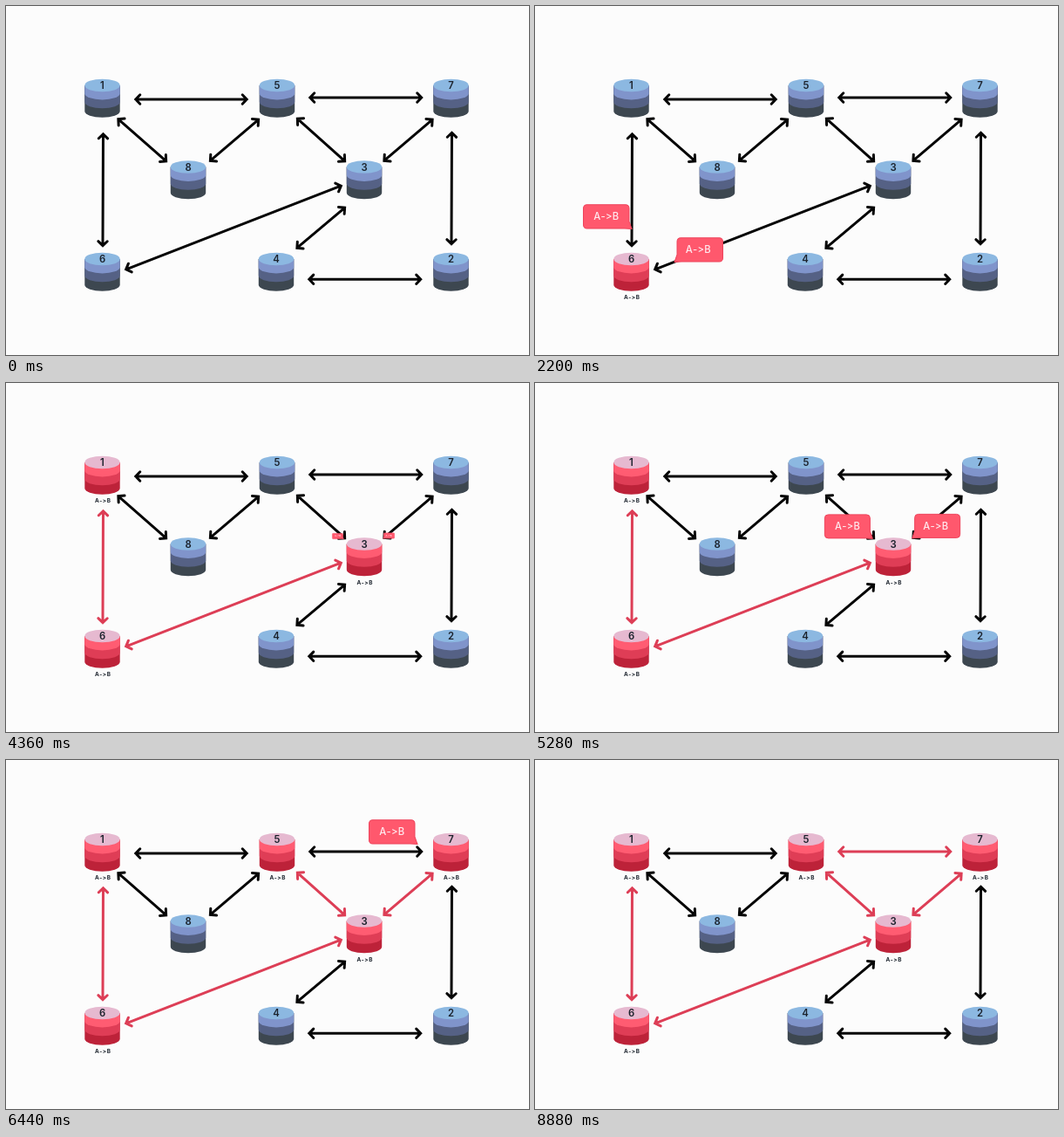
Animation, 600 px wide and 400 px high, one loop 9.04 s. Source, as an HTML page with a canvas:

```html
<!DOCTYPE html>
<html lang="en">
<head>
<meta charset="utf-8">
<title>Gossip network</title>
<style>
  html, body { margin: 0; width: 100%; height: 100%; overflow: hidden; background: #fcfcfc; }
  canvas { display: block; width: 600px; height: 400px; }
</style>
</head>
<body>
<canvas id="stage"></canvas>
<script>
const LOOP = 9040, STEP = 40, POP = 310, SHRINK = 300;
const canvas = document.getElementById('stage');
const ctx = canvas.getContext('2d');
const dpr = window.devicePixelRatio || 1;
canvas.width = 600 * dpr;
canvas.height = 400 * dpr;

const BLUE = ['#8cb8e1', '#8094cb', '#556185', '#3d4750'];
const RED = ['#e6b9d0', '#ff5c72', '#df3d56', '#bd2239'];
const INK = '#1b222c';

// Label, centre x, lid y and the time the node turns red
const nodes = [
  ['1', 110.5, 91, 3600], ['5', 311, 91, 5840], ['7', 510.5, 91, 5840],
  ['8', 209, 184.5, Infinity], ['3', 411, 184.5, 3600], ['6', 110.5, 290, 1880],
  ['4', 310, 290, Infinity], ['2', 510.5, 290, Infinity]
];

// Both tips and the time the link turns red
const links = [
  [147, 107, 278, 107, Infinity], [347, 105, 478.5, 105, 7320],
  [111.5, 145, 111, 276.5, 3600], [127.5, 128.5, 185, 179, Infinity],
  [233, 178.5, 291, 129, Infinity], [333, 128, 390, 179, 5840],
  [432.5, 178.5, 490.5, 129, 5840], [511.5, 143.5, 511, 274.5, Infinity],
  [136, 302.5, 386, 205.5, 3600], [332.5, 278.5, 390, 230, Infinity],
  [346, 313.3, 477.5, 313.3, Infinity]
];

// Tail path, side of the body, and times: pop, move, move length, end
const packets = [
  { from: [111, 256], to: [111, 144], side: -1, pop: 1907, move: 2950, span: 620, end: 3600 },
  { from: [160, 294], to: [380, 210], side: 1, pop: 1907, move: 2950, span: 620, end: 3600 },
  { from: [387.5, 179], to: [333, 128], side: -1, pop: 4347, move: 5260, span: 580, end: 5840 },
  { from: [432.5, 178.5], to: [487.5, 132], side: 1, pop: 4347, move: 5260, span: 580, end: 5840 },
  { from: [472, 97], to: [395, 97], side: -1, pop: 6147, move: 6910, span: 400, end: 7320 }
];

const bubbles = [
  { x: 125.5, y: 279, w: 101, h: 48.5, pop: 187, out: 1550, swing: 0.72,
    fill: '#fdfdff', edge: '#c6d4ee', line: 1, size: 9.6,
    text: [['New Transaction', 17, -29], ['A->B', 17, -14]] },
  { x: 340.5, y: 95.2, w: 93, h: 45, pop: 7402, out: 8580, swing: 0,
    fill: '#f9a72d', edge: '#c98d33', line: 1.5, size: 9.15,
    text: [['Already', 18.5, -27.2], ['Heard That !', 18.5, -12.2]] }
];

const clamp = v => Math.min(1, Math.max(0, v));
const easeInOut = p => p < 0.5 ? 2 * p * p : 1 - 2 * (1 - p) ** 2;
const backOut = p => 1 + 4.1 * (p - 1) ** 3 + 3.1 * (p - 1) ** 2;
const popScale = (t, start) => backOut(clamp((t - start) / POP));

// Glyph by glyph, so that "->" never becomes a ligature
function write(str, x, y, size, weight, color, centered, gap = 0) {
  ctx.font = `${weight} ${size}px Inter, "Open Sans", sans-serif`;
  ctx.fillStyle = color;
  ctx.textAlign = 'left';
  const widths = [...str].map(c => ctx.measureText(c).width + gap);
  if (centered) x -= (widths.reduce((a, b) => a + b, 0) - gap) / 2;
  [...str].forEach((c, i) => {
    ctx.fillText(c, x, y);
    x += widths[i];
  });
}

function drawLink([x1, y1, x2, y2, redAt], t) {
  const len = Math.hypot(x2 - x1, y2 - y1);
  ctx.save();
  ctx.translate(x1, y1);
  ctx.rotate(Math.atan2(y2 - y1, x2 - x1));
  ctx.strokeStyle = t >= redAt ? '#dd3e56' : '#050505';
  ctx.lineWidth = 3;
  ctx.lineCap = 'round';
  ctx.beginPath();
  ctx.moveTo(2, 0);
  ctx.lineTo(len - 2, 0);
  for (const [tip, back] of [[1.8, 6.8], [len - 1.8, len - 6.8]]) {
    ctx.moveTo(back, -5.2);
    ctx.lineTo(tip, 0);
    ctx.lineTo(back, 5.2);
  }
  ctx.stroke();
  ctx.restore();
}

function drawNode([label, x, y, redAt], t) {
  const red = t >= redAt, colors = red ? RED : BLUE;
  const rx = 20.2, ry = 7.3;
  [29.5, 19, 9.2].forEach((depth, i) => {
    ctx.fillStyle = colors[3 - i];
    ctx.beginPath();
    ctx.moveTo(x - rx, y);
    ctx.lineTo(x + rx, y);
    ctx.lineTo(x + rx, y + depth);
    ctx.ellipse(x, y + depth, rx, ry, 0, 0, Math.PI);
    ctx.closePath();
    ctx.fill();
  });
  ctx.fillStyle = colors[0];
  ctx.beginPath();
  ctx.ellipse(x, y, rx, ry, 0, 0, 2 * Math.PI);
  ctx.fill();
  write(label, x, y + 4, 11.3, 600, INK, true);
  if (red) write('A->B', x + 0.5, y + 46, 6.4, 700, INK, true, 0.5);
}

function drawPacket({ from, to, side, pop, move, span, end }, t) {
  if (t < pop || t >= end) return;
  const p = easeInOut(clamp((t - move) / span));
  const s = popScale(t, pop);
  ctx.save();
  ctx.translate(from[0] + (to[0] - from[0]) * p, from[1] + (to[1] - from[1]) * p);
  ctx.scale(s, s);
  ctx.fillStyle = '#ff586d';
  ctx.strokeStyle = '#ee435b';
  ctx.lineWidth = 1;
  ctx.beginPath();
  ctx.moveTo(0, -0.5);
  ctx.lineTo(side * 3, -9);
  ctx.arcTo(side * 3, -28, side * 8, -28, 4);
  ctx.arcTo(side * 55, -28, side * 55, -20, 4);
  ctx.arcTo(side * 55, -1, side * 45, -1, 4);
  ctx.lineTo(side * 8, -1);
  ctx.closePath();
  ctx.fill();
  ctx.stroke();
  write('A->B', side * 29 - (side > 0 ? 2 : 0), -10.6, 11.2, 500, '#ffe9ee', true, 0.3);
  ctx.restore();
}

function drawBubble(b, t) {
  if (t < b.pop || t >= b.out + SHRINK) return;
  const s = t < b.out ? popScale(t, b.pop) : backOut(1 - (t - b.out) / SHRINK);
  ctx.save();
  ctx.translate(b.x, b.y);
  ctx.rotate(-b.swing * Math.max(0, s - 1));
  ctx.scale(s, s);
  ctx.fillStyle = b.fill;
  ctx.strokeStyle = b.edge;
  ctx.lineWidth = b.line;
  ctx.lineJoin = 'round';
  ctx.beginPath();
  ctx.moveTo(0, 0);
  ctx.lineTo(8, -13);
  ctx.arcTo(8, -b.h, 16, -b.h, 6);
  ctx.arcTo(b.w, -b.h, b.w, -10, 6);
  ctx.arcTo(b.w, 0, 20, 0, 6);
  ctx.closePath();
  ctx.fill();
  ctx.stroke();
  for (const [str, x, y] of b.text) write(str, x, y, b.size, 600, INK);
  ctx.restore();
}

function draw(t) {
  ctx.setTransform(dpr, 0, 0, dpr, 0, 0);
  ctx.fillStyle = '#fcfcfc';
  ctx.fillRect(0, 0, 600, 400);
  links.forEach(l => drawLink(l, t));
  nodes.forEach(n => drawNode(n, t));
  packets.forEach(p => drawPacket(p, t));
  bubbles.forEach(b => drawBubble(b, t));
}

const start = performance.now();
function tick() {
  const t = (performance.now() - start) % LOOP;
  draw(Math.floor(t / STEP) * STEP);
  requestAnimationFrame(tick);
}
tick();
</script>
</body>
</html>
```
